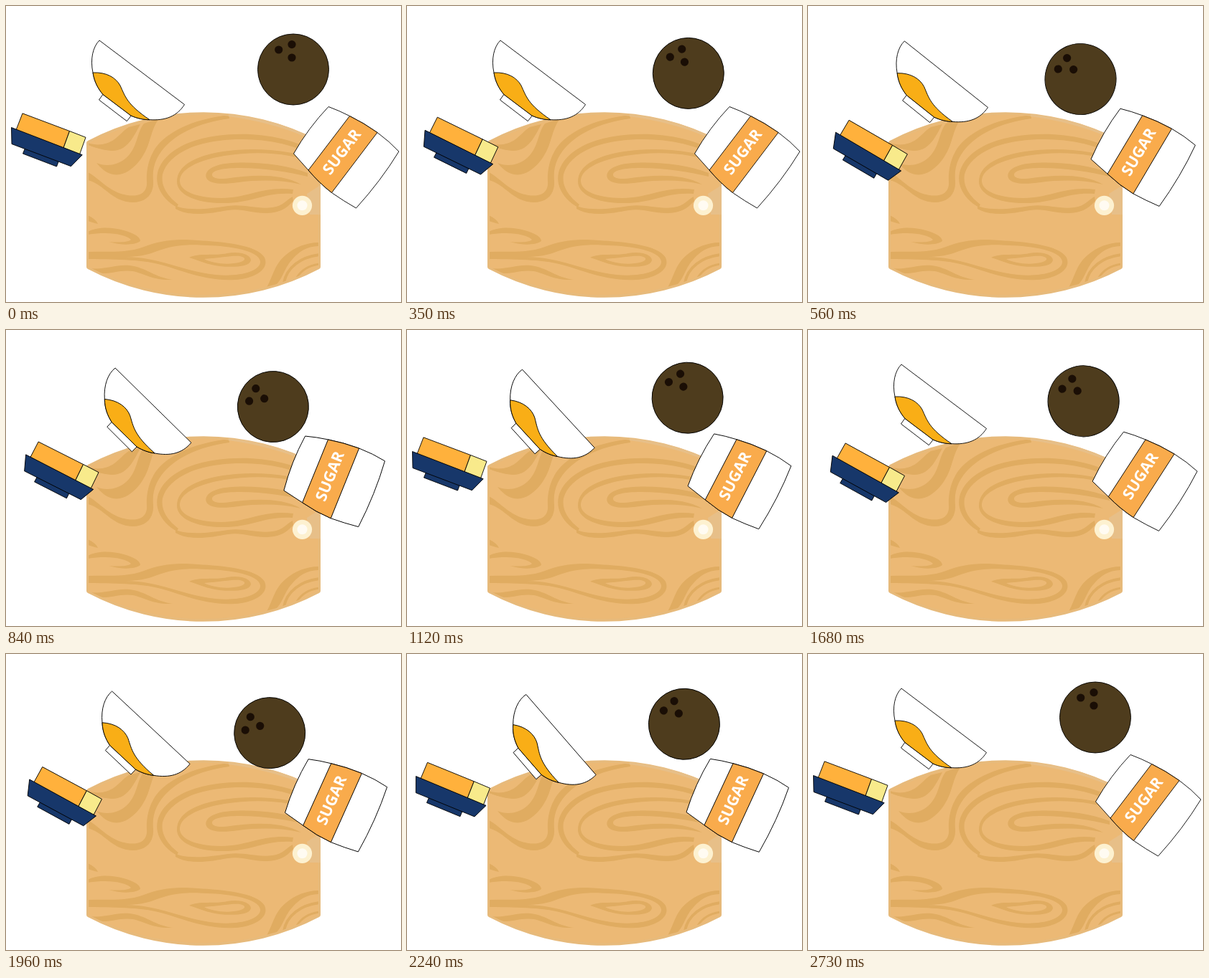
An HTML page that plays this animation: 550 px wide and 413 px high, repeating every 2.94 s.

```html
<!DOCTYPE html>
<html lang="en">
<head>
<meta charset="utf-8">
<title>Baking board</title>
<style>
  html, body { margin: 0; width: 100%; height: 100%; overflow: hidden; background: #fff; }
  svg { display: block; width: 100vw; height: 100vh; }
  .line { stroke: #000; stroke-width: .9; stroke-linejoin: miter; }
  .grain path { fill: #e0ac61; }
  .grain .s { fill: none; stroke: #e0ac61; stroke-width: 6; }
  text { font: 700 21.5px "Open Sans", "Noto Sans", sans-serif; fill: #fff; text-anchor: middle; }
</style>
</head>
<body>
<svg viewBox="0 0 550 413" xmlns="http://www.w3.org/2000/svg">
  <defs>
    <clipPath id="face">
      <path d="M115 191A345 345 0 0 1 435 191V364A345 345 0 0 1 115 364Z"/>
    </clipPath>
  </defs>

  <g id="board">
    <path fill="#e7ba7b" d="M112 191Q112 189 114 188A345 345 0 0 1 436 188Q438 189 438 191V364Q438 366 436 367A345 345 0 0 1 114 367Q112 366 112 364Z"/>
    <path fill="#ecb975" d="M115 191A345 345 0 0 1 435 191V364A345 345 0 0 1 115 364Z"/>
    <g class="grain" clip-path="url(#face)">
      <path d="M114 191C128 196 141 193 151 186C158 181 164 173 171 169L187 165C180 178 174 191 163 198C151 205 136 202 114 194Z"/>
      <path d="M126 219C138 224 154 223 166 213C184 198 181 178 192 164L213 157C201 173 202 192 190 210C180 226 164 238 149 235C139 233 132 226 126 219Z"/>
      <path d="M114 232C130 240 143 260 169 264C189 267 197 258 196 245C195 225 201 202 218 187C235 172 262 158 310 152L311 157C272 162 243 176 226 192C210 207 203 224 205 244C206 262 196 274 176 274C147 273 137 249 114 243Z"/>
      <path d="M238 281C218 270 207 251 211 233C217 207 248 187 294 181C345 174 398 183 436 206V212C397 190 346 182 297 188C254 193 224 211 218 235C215 252 226 266 240 277Z"/>
      <path d="M436 221C396 204 348 202 304 209C267 215 242 228 242 244C242 259 267 268 300 268C337 268 357 251 400 256L399 262C361 259 343 275 302 275C264 275 238 263 238 245C238 223 263 209 302 203C349 196 400 202 436 215Z"/>
      <path d="M420 233C386 220 340 216 305 220C285 223 276 231 279 240C283 249 303 249 324 246C356 242 384 243 411 249C382 233 343 236 312 240C298 242 288 241 287 236C286 229 304 226 325 226C361 226 394 232 420 238Z"/>
      <path d="M236 279C258 287 287 282 309 279C332 276 350 284 371 281C386 279 391 270 399 266L400 272C390 283 382 288 364 289C344 290 330 282 309 285C286 289 257 295 236 283Z"/>
      <path d="M114 292C120 295 126 299 128 304C123 303 118 301 114 300Z"/>
      <path d="M114 315C126 308 147 308 164 313C178 317 187 322 187 328C180 334 160 334 143 329C155 330 170 330 174 326C168 319 143 314 114 319Z"/>
      <path d="M114 343C143 342 168 345 192 336C213 328 234 324 267 327C301 329 350 333 360 351C367 366 349 380 319 382C282 384 252 372 223 363C190 353 158 354 114 353V348Q151 348 184 351C222 355 252 371 292 375C326 378 355 370 354 356C351 341 313 335 279 334C243 331 223 337 205 344C181 353 150 350 114 349Z"/>
      <path fill-rule="evenodd" d="M255 351C268 344 290 349 308 345C326 342 341 347 341 355C339 364 317 365 297 363C281 361 268 355 255 351ZM276 353C285 358 303 361 317 359C329 358 335 354 331 351C323 346 306 351 276 353Z"/>
      <path d="M363 393C372 376 374 360 390 347C403 336 419 330 436 330V335C419 335 408 343 400 352C387 365 386 381 374 391Z"/>
      <path class="s" style="stroke-width:4" d="M387 386C391 365 410 350 437 347"/>
      <path class="s" style="stroke-width:3" d="M405 379C411 369 421 362 437 360"/>
      <path d="M114 366C139 369 157 358 178 363C197 367 207 378 232 382C202 383 193 373 176 370C157 367 142 377 122 371Z"/>
    </g>
    <path fill="#e7bf88" d="M310 151Q375 158 420 181L416 182Q368 162 310 154ZM419 262L438 250V291H423Z"/>
    <circle cx="412.5" cy="278.3" r="13.6" fill="#fdf1d0"/>
    <circle cx="412.5" cy="278.3" r="7" fill="#fffbf2"/>
  </g>

  <g id="butter" class="line">
    <path fill="#17376a" d="M26.5 198.5L23.5 206L70.5 224L73.5 216Z"/>
    <path fill="#ffb13c" d="M23 149.8L88.5 174.5L80 198L14 173Z"/>
    <path fill="#f8ea8b" d="M88.5 174.5L111 183.3L102.5 207L80 198Z"/>
    <path fill="#17376a" d="M7.5 169.5L106.2 207.7L90.5 223.7L8 192.5Z"/>
  </g>

  <g id="bowl" class="line">
    <path fill="#fff" d="M135.5 122.5L129.5 131L168.3 160.7L175 152Z"/>
    <path fill="#fff" d="M130 48C121 57 117 74 121 93C123 106 128 115 135 123.5L174 153C183 157 192 158.7 200 158.7C222 160 238 154 248.5 137.5Z"/>
    <path fill="#f9ae16" d="M121 93C140 92 153 100 159 111C166 126 168 137 200 158.7C192 158.7 183 157 174 153L135 123.5C128 115 123 106 121 93Z"/>
  </g>

  <g id="ball">
    <circle class="line" cx="400" cy="88.5" r="49.5" fill="#4e3c1d"/>
    <g fill="#1a0e05">
      <circle cx="379.7" cy="61" r="5.6"/>
      <circle cx="398" cy="53.6" r="5.6"/>
      <circle cx="398" cy="72" r="5.6"/>
    </g>
  </g>

  <g id="sugar">
    <path class="line" fill="#fff" d="M449 140.5Q464 146 478.5 153.5Q498 163 517 176.5Q534 189 547 203Q522 244 487.5 282Q470 272 453.5 260.5Q436 247 421 229L400.5 206Q421 170 449 140.5Z"/>
    <path class="line" fill="#f9ab4c" d="M478.5 153.5Q498 163 517 176.5L453.5 260.5Q436 247 421 229Z"/>
    <text transform="translate(467.3 203.3) rotate(-53)" y="7.7">SUGAR</text>
  </g>
</svg>
<script>
  const TICK = 70, TICKS = 42, CYCLE = 17, RISE = 8, FALL = 7;

  // start tick, pivot, full shift and full turn of each swing
  const parts = [
    { id: "butter", start: 1, x: 67, y: 166.7, dx: 35.1, dy: 18.8, turn: 10.75 },
    { id: "ball", start: 3, x: 400, y: 88.5, dx: -32.8, dy: 21.6, turn: -47 },
    { id: "sugar", start: 5, x: 471, y: 207.9, dx: -17.8, dy: -0.6, turn: -17.3 },
    { id: "bowl", start: 7, x: 189.25, y: 92.75, dx: 25.2, dy: 19.8, turn: 12 }
  ];
  for (const p of parts) p.el = document.getElementById(p.id);

  function swing(tick, start) {
    if (tick < start || tick >= start + 2 * CYCLE) return 0;
    const k = (tick - start) % CYCLE;
    return k <= RISE ? k / RISE : Math.max(0, 1 - (k - RISE) / FALL);
  }

  function draw(ms) {
    const tick = Math.floor(ms / TICK) % TICKS;
    for (const p of parts) {
      const s = swing(tick, p.start);
      p.el.setAttribute("transform",
        `translate(${p.dx * s} ${p.dy * s}) rotate(${p.turn * s} ${p.x} ${p.y})`);
    }
  }

  let t0 = null;
  function frame(now) {
    if (t0 === null) t0 = now;
    draw(now - t0);
    requestAnimationFrame(frame);
  }
  draw(0);
  requestAnimationFrame(frame);
</script>
</body>
</html>
```
